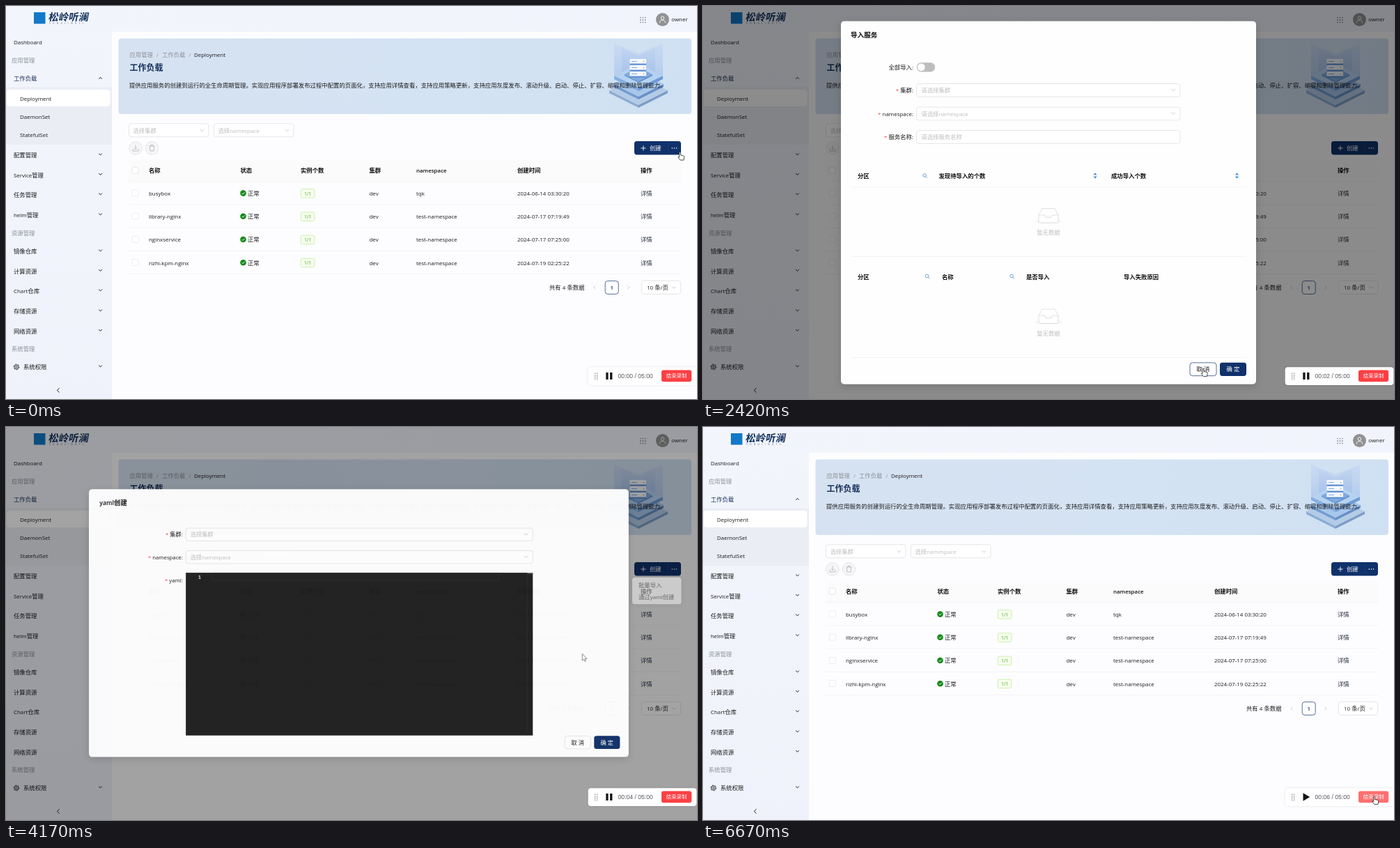
These frames come from a looping animation (992x564 px, 6.76 s). An HTML page:

```html
<!DOCTYPE html>
<html lang="zh-CN">
<head>
<meta charset="utf-8">
<title>工作负载</title>
<style>
html, body { margin: 0; width: 100%; height: 100%; overflow: hidden; background: #fdfdff; }
svg { display: block; width: 100vw; height: 100vh; }
text { font-family: "Open Sans", "Noto Sans CJK SC", "Noto Sans CJK", sans-serif; white-space: pre; }
.clock { font-family: "Liberation Sans", Arial, sans-serif; }
.mono { font-family: "Noto Sans Mono", "DejaVu Sans Mono", monospace; }
.card { filter: drop-shadow(0 3px 6px rgba(0, 0, 0, .14)); }
.soft { filter: drop-shadow(0 2px 4px rgba(0, 0, 0, .14)); }
.faint { filter: drop-shadow(0 0 1.5px rgba(0, 0, 0, .12)); }
</style>
</head>
<body>
<svg id="stage" viewBox="0 0 992 564" preserveAspectRatio="none"></svg>
<script>
const NAVY = '#10316a', INK = '#1c1c1e', GREY = '#8d9199', PALE = '#bfbfc2', EDGE = '#dcdce0', RULE = '#f0f0f1';

// ---- drawing helpers ----
// Latin runs are set a little smaller than the Chinese ones
function text(x, y, s, o = {}) {
  const { size = 8.4, fill = INK, w = 400, anchor = 'start', more = '' } = o;
  const runs = s.match(/[\x00-\x7f]+|[^\x00-\x7f]+/g).map(r =>
    `<tspan font-size="${r.charCodeAt(0) < 128 ? size * .945 : size}">${r}</tspan>`).join('');
  return `<text x="${x}" y="${y + size * .36}" fill="${fill}" font-weight="${w}" text-anchor="${anchor}" ${more}>${runs}</text>`;
}
const rect = (x, y, x2, y2, fill, more = '') =>
  `<rect x="${x}" y="${y}" width="${x2 - x}" height="${y2 - y}" fill="${fill}" ${more}/>`;
const box = (x, y, x2, y2, stroke = EDGE, fill = '#fff', r = 3.6) =>
  rect(x, y, x2, y2, fill, `rx="${r}" stroke="${stroke}" stroke-width=".7"`);
const path = (d, stroke, w = .8, fill = 'none', more = '') =>
  `<path d="${d}" stroke="${stroke}" stroke-width="${w}" fill="${fill}" ${more}/>`;
const line = (x, x2, y, c = RULE) => path(`M${x} ${y}H${x2}`, c, .7);
const dot = (x, y, r, fill, more = '') => `<circle cx="${x}" cy="${y}" r="${r}" fill="${fill}" ${more}/>`;
const poly = (pts, fill) => `<polygon points="${pts}" fill="${fill}"/>`;
const chevron = (x, y, c = '#b9b9bd', h = 2.6, w = .8) =>
  path(`M${x - Math.abs(h)} ${y - h / 2}l${Math.abs(h)} ${h}l${Math.abs(h)} ${-h}`, c, w);
const angle = (x, y, d, c, w = .8) => path(`M${x + d / 2} ${y - Math.abs(d)}l${-d} ${Math.abs(d)}l${d} ${Math.abs(d)}`, c, w);
const group = (id, s) => `<g id="${id}">${s}</g>`;
const bold = { w: 600, fill: '#111' };

// ---- page ----
function sidebar() {
  const items = [[214, '配置管理'], [242.5, 'Service管理'], [271, '任务管理'], [300, 'helm管理'], [352, '镜像仓库'],
    [380.5, '计算资源'], [409, 'Chart仓库'], [438, '存储资源'], [466.5, '网络资源'], [518, '系统权限']];
  let s = rect(0, 0, 992, 564, 'url(#head)') + rect(0, 37, 152, 564, 'url(#side)') +
    rect(152, 37, 992, 564, '#fdfdff') + rect(0, 116.5, 152, 199, '#eaedf4') +
    rect(1, 120, 149.5, 144, '#fff', 'rx="4"');
  s += text(11, 52, 'Dashboard') + text(11, 103.5, '工作负载', { fill: '#1b3158' }) + chevron(135.5, 103.5, INK, -2.3, 1);
  [[77.5, '应用管理'], [326, '资源管理'], [492, '系统管理']].forEach(([y, n]) => s += text(8, y, n, { fill: GREY }));
  [[132.5, 'Deployment'], [159, 'DaemonSet'], [185, 'StatefulSet']].forEach(([y, n]) => s += text(20, y, n));
  items.forEach(([y, n]) => s += text(y === 518 ? 25 : 11, y, n) + chevron(135.5, y - 1.2, INK, 2.3, 1));
  s += dot(15, 518, 3.2, 'none', `stroke="${INK}" stroke-width=".9"`) + dot(15, 518, 1.3, 'none', `stroke="${INK}" stroke-width=".7"`) +
    dot(15, 518, 4, 'none', `stroke="${INK}" stroke-width=".8" stroke-dasharray="1.5 2.69"`);
  return s + angle(75, 551.5, 3.2, INK, 1);
}

function header() {
  let s = rect(40, 9, 56.5, 25.5, '#1378c8') +
    text(0, 0, '松岭听澜', { size: 14.4, w: 900, fill: '#17345f', more: 'transform="translate(61.5 16.3) skewX(-10)"' }) +
    text(62, 24.3, 'SONGLINGTL', { size: 3.4, fill: '#4a6288', more: 'letter-spacing="3.3"' });
  for (let i = 0; i < 9; i++) s += dot(911 + i % 3 * 3.4, 16.6 + Math.floor(i / 3) * 3.4, .9, '#8b8f98');
  s += dot(942.5, 19.5, 9.5, '#929294') + dot(942.5, 17.2, 2.2, 'none', 'stroke="#fff" stroke-width=".9"') +
    path('M938.3 24.4a4.2 4 0 0 1 8.4 0', '#fff', .9);
  return s + text(955.3, 19, 'owner');
}

function banner() {
  let s = rect(161.5, 46.5, 984, 155, 'url(#ban)', 'rx="4"');
  s += poly('873,54 908,68 943,54 943,100 908,118 873,100', 'url(#beam)') + poly('884,60 908,72 932,60 932,98 908,108 884,98', 'url(#beam)');
  const tile = (y, w, h, d, top, left, right) =>
    poly(`${908 - w},${y} 908,${y + h} 908,${y + h + d} ${908 - w},${y + d}`, left) +
    poly(`${908 + w},${y} 908,${y + h} 908,${y + h + d} ${908 + w},${y + d}`, right) +
    poly(`${908 - w},${y} 908,${y - h} ${908 + w},${y} 908,${y + h}`, top);
  s += tile(121, 42, 21, 4, '#b4cbe6', '#8cacd2', '#7c9cc6') + tile(112, 36, 18, 4, '#a7c6ea', '#719cd2', '#6590c6') +
    tile(100, 35, 17, 5, '#b6d2f1', '#84afe2', '#6f9bd5') + tile(98, 20, 10, 2, '#7fabe0', '#6796d4', '#5c8ac9');
  for (let y = 76; y < 96; y += 9)
    s += rect(895.5, y, 919, y + 7.6, '#f3f8ff', 'rx="1"') + rect(895.5, y + 6.6, 919, y + 8.6, '#5d8dd0') +
      rect(898, y + 3, 906, y + 4, '#86abdf') + dot(915.5, y + 3.5, .9, '#d9b46a');
  s += text(177.5, 69.5, '应用管理', { fill: GREY }) + text(216, 69.5, '/', { fill: GREY }) +
    text(224, 69.5, '工作负载', { fill: GREY }) + text(262.5, 69.5, '/', { fill: GREY }) + text(270, 69.5, 'Deployment');
  s += text(177.5, 88.5, '工作负载', { size: 12, w: 700, fill: '#17305c' });
  return s + text(177, 113.7, '提供应用服务的创建到运行的全生命周期管理。实现应用程序部署发布过程中配置的页面化，支持应用详情查看，支持应用策略更新，支持应用灰度发布、滚动升级、启动、停止、扩容、缩容和删除管理能力。');
}

function list() {
  let s = '';
  [[176.5, '选择集群'], [298.5, '选择namespace']].forEach(([x, n]) =>
    s += box(x, 168.8, x + 114.5, 187.8) + text(x + 6, 178.8, n, { fill: PALE }) + chevron(x + 105, 178.6));
  [186, 209.5].forEach(x => s += dot(x, 204, 9.2, '#f6f6f8', `stroke="${EDGE}" stroke-width=".7"`));
  s += path('M186 199.5v6M184 203.6l2 2l2 -2M182 205v3h8v-3', '#aeb0b5') +
    path('M205.6 201h7.8M206.6 201v7h5.8v-7M208 201v-1.5h3v1.5', '#aeb0b5');
  s += rect(902, 194, 969, 213.4, NAVY, 'rx="3.6"') + path('M911.5 204h7M915 200.5v7', '#fff', .9) +
    text(924, 204, '创建', { fill: '#fff' }) + path('M950.5 194v19.4', '#1d437f', .6);
  for (let i = 0; i < 3; i++) s += dot(956.3 + i * 3.1, 204, .8, '#fff');

  const cols = [205, 336.5, 423, 521.5, 589, 734, 911];
  s += rect(176, 220, 969, 252, '#fbfbfc', 'rx="4"') + box(181.2, 231.3, 190.2, 240.3, EDGE, '#fff', 2);
  ['名称', '状态', '实例个数', '集群', 'namespace', '创建时间', '操作'].forEach((n, i) => s += text(cols[i], 236.3, n, bold));
  s += line(176, 969, 252);
  const rows = [['busybox', 'tqk', '2024-06-14 03:30:20'], ['library-nginx', 'test-namespace', '2024-07-17 07:19:49'],
    ['nginxservice', 'test-namespace', '2024-07-17 07:25:00'], ['rizhi-kpm-nginx', 'test-namespace', '2024-07-19 02:25:22']];
  rows.forEach(([name, space, date], i) => {
    const y = 269 + i * 33.2;
    s += box(181.2, y - 5, 190.2, y + 4, '#e4e4e7', '#fff', 2) + text(205, y, name) +
      dot(340.5, y - .4, 4.3, '#128a17') + path(`M338.6 ${y - .4}l1.4 1.5l2.5 -2.8`, '#fff', .9) + text(347, y, '正常') +
      box(423.3, y - 6.3, 443, y + 6.2, '#b7eb8f', '#f6ffed', 2.2) + text(433.2, y, '1/1', { size: 7.4, fill: '#4ca32a', anchor: 'middle' }) +
      text(521.5, y, 'dev') + text(589, y, space) + text(734, y, date) + text(911, y, '详情', { fill: '#2a3040' }) +
      line(176, 969, y + 16);
  });
  return s + text(780, 404, '共有 4 条数据') + angle(845, 404, 2.4, PALE) + box(860.2, 394.6, 879.2, 413.4, NAVY) +
    text(869.7, 404, '1', { w: 600, fill: NAVY, anchor: 'middle' }) + angle(893.7, 404, -2.4, PALE) +
    box(912.3, 394.3, 968.7, 413.4) + text(920, 404, '10 条/页') + chevron(959, 404);
}

// ---- dialogs ----
const label = (x, y, s, must = true) =>
  text(x, y, (must ? '* ' : '') + s + ':', { anchor: 'end' }).replace('>* ', '><tspan fill="#ff4d4f">* </tspan>');

function field(x, x2, y, name, hint, arrow) {
  return label(x - 4.5, y, name) + box(x, y - 9.4, x2, y + 9.4) + text(x + 6.8, y, hint, { fill: PALE }) +
    (arrow ? chevron(x2 - 9.8, y - .4) : '');
}
function buttons(x, y, id) {
  return `<rect id="${id}" x="${x}" y="${y - 9.4}" width="38" height="18.8" rx="3.6" fill="#fff" stroke="${EDGE}" stroke-width=".7"/>` +
    text(x + 19, y, '取 消', { anchor: 'middle' }) + rect(x + 43, y - 9.6, x + 81, y + 9.6, NAVY, 'rx="3.6"') +
    text(x + 62, y, '确 定', { anchor: 'middle', fill: '#fff' });
}
const lens = (x, y) => dot(x - .5, y - .5, 2.3, 'none', 'stroke="#4a90d2" stroke-width=".8"') + path(`M${x + 1.2} ${y + 1.2}l2 2`, '#4a90d2', .9);
const sorter = (x, y) => poly(`${x - 2.6},${y - 1} ${x},${y - 4.2} ${x + 2.6},${y - 1}`, '#4a90d2') +
  poly(`${x - 2.6},${y + 1} ${x},${y + 4.2} ${x + 2.6},${y + 1}`, '#4a90d2');
const empty = y => `<ellipse cx="496" cy="${y + 9}" rx="19" ry="3.6" fill="#f5f5f5"/>` +
  path(`M482 ${y}l5 -9.5h18l5 9.5v10q0 1 -1 1h-26q-1 0 -1 -1z`, '#d9d9d9', .8, '#fff') +
  path(`M482 ${y}h8.5q.5 3.4 2.6 3.4h5.8q2.1 0 2.6 -3.4h8.5`, '#d9d9d9', .8, '#fafafa') +
  text(496, y + 25, '暂无数据', { fill: PALE, anchor: 'middle' });

function importDialog() {
  const heads = (y, list) => list.map(([x, n]) => text(x, y, n, bold)).join('');
  return rect(198, 21.7, 794, 542.7, '#fefeff', 'rx="4.8" class="card"') + text(212, 41.2, '导入服务', { size: 9.6, ...bold }) +
    label(302, 88, '全部导入', false) + rect(306.7, 81.2, 333.2, 94.4, '#bdbdbd', 'rx="6.6"') + dot(313.3, 87.8, 5.4, '#fff') +
    field(306.5, 685, 121, '集群', '请选择集群', true) + field(306.5, 685, 154.5, 'namespace', '请选择namespace', true) +
    field(306.5, 685, 188, '服务名称', '请选择服务名称') +
    heads(244, [[222, '分区'], [338.5, '发现待导入的个数'], [586, '成功导入个数']]) +
    lens(318.5, 243.5) + sorter(563, 243.5) + sorter(766.5, 243.5) + line(212, 780, 260) + empty(300) + line(212, 780, 359.5) +
    heads(388.5, [[222, '分区'], [343, '名称'], [464, '是否导入'], [604, '导入失败原因']]) +
    lens(322, 388) + lens(443.5, 388) + empty(444.5) + line(212, 780, 504.5) + buttons(699, 521.3, 'no1');
}
function yamlDialog() {
  return rect(99.2, 85.4, 892.8, 479, '#fefeff', 'rx="4.8" class="card"') + text(114.8, 105, 'yaml创建', { size: 9.6, ...bold }) +
    field(241.7, 751.9, 152, '集群', '选择集群', true) + field(241.7, 751.9, 185.2, 'namespace', '选择namespace', true) +
    label(237.2, 219, 'yaml') + rect(241.7, 208.2, 751.9, 447.4, '#1f1f1f') +
    rect(280.6, 208.9, 702, 219.5, 'none', 'stroke="#2d2d2d" stroke-width=".8"') +
    path('M743.6 208.2v239.2', '#343434', .6) + rect(743.8, 208.2, 751.9, 209.4, '#8a8a8a') +
    text(262, 214.3, '1', { size: 8, w: 600, fill: '#d6d6d6', anchor: 'middle', more: 'class="mono"' }) + buttons(799, 457.6, 'no2');
}

function recorder() {
  let s = rect(835.7, 518.3, 991.4, 544, '#fff', 'rx="4" class="faint"');
  for (let i = 0; i < 8; i++) s += dot(845.7 + i % 2 * 3, 527.2 + (i >> 1) * 2.7, .75, '#777');
  s += group('pause', rect(861.3, 526, 864.6, 536, '#161616') + rect(867.1, 526, 870.4, 536, '#161616')) +
    group('play', poly('861.5,525.2 871.2,531 861.5,536.8', '#161616'));
  s += `<text id="clock" class="clock" x="878.6" y="534.2" font-size="8.6" fill="#55585e"></text>`;
  return s + `<rect id="stop" x="941" y="522.4" width="43.2" height="16.8" rx="3"/>` +
    text(962.6, 530.8, '结束录制', { size: 7.4, fill: '#fff', anchor: 'middle' });
}

const stage = document.getElementById('stage');
const grad = (id, dir, stops) => `<linearGradient id="${id}" x1="0" y1="0" ${dir}>` +
  stops.map(([o, c, a = 1]) => `<stop offset="${o}" stop-color="${c}" stop-opacity="${a}"/>`).join('') + '</linearGradient>';
stage.innerHTML = '<defs>' + grad('head', 'x2="1" y2="0"', [[0, '#f2f5fc'], [1, '#f1f4fc']]) +
  grad('side', 'x2="0" y2="1"', [[0, '#f2f5fc'], [1, '#eff2fa']]) +
  grad('ban', 'x2="1" y2="0"', [[0, '#d6e2f1'], [.6, '#d4e3f3'], [1, '#cfe0f2']]) +
  grad('beam', 'x2="0" y2="1"', [[0, '#b9cdf0', .35], [1, '#8fb3e6', .6]]) + '</defs>' +
  sidebar() + header() + banner() + list() +
  '<rect id="mask" width="992" height="564"/>' +
  group('dlg1', importDialog()) + group('dlg2', yamlDialog()) +
  group('menu', rect(899, 216, 969.5, 259, '#fff', 'rx="4" class="soft"') + text(908, 228.5, '批量导入') + text(908, 247.5, '通过yaml创建')) +
  recorder() +
  group('arrow', path('M0 0v9.6l2.2 -2l1.5 3.3l1.5 -.7l-1.5 -3.2h3z', '#444', .6, '#fff')) +
  group('hand', path('M-.9 .5q.9 -1 1.8 0v4l4.2 .9q1.2 .3 1.1 1.6l-.7 4.6h-5l-3.2 -4q-.2 -1.2 1.8 -.2z', '#222', .8, '#fff', 'stroke-linejoin="round"'));

// ---- motion ----
const LOOP = 6760, $ = id => document.getElementById(id);
const clamp = v => Math.max(0, Math.min(1, v));
const ramp = (t, start, len) => clamp((t - start) / len);

function bezier(a, b, c, d) {
  const at = (p, q, u) => 3 * (1 - u) ** 2 * u * p + 3 * (1 - u) * u * u * q + u ** 3;
  return x => {
    let lo = 0, hi = 1;
    for (let i = 0; i < 24; i++) { const m = (lo + hi) / 2; at(a, c, m) < x ? lo = m : hi = m; }
    return at(b, d, lo);
  };
}
const easeIn = bezier(.08, .82, .17, 1), easeOut = bezier(.78, .14, .15, .86);

const dialogs = [
  { id: 'dlg1', x: 940, y: 227, open: 960, shut: 2424 },
  { id: 'dlg2', x: 938, y: 248, open: 4030, shut: 5701 }
];
const menus = [[90, 860], [2990, 4060]];
const hands = [[0, 1060], [1750, 2430], [2900, 4040], [4920, 5690], [6250, LOOP]];
const track = [[0, 967.5, 209.5], [330, 960, 203], [500, 960, 203], [750, 940, 226], [1040, 940, 226], [1330, 868, 295],
  [1830, 718, 520], [2420, 718, 520], [2500, 806, 458], [2580, 916, 378], [2750, 948, 275], [2920, 960.5, 201.5],
  [3500, 960.5, 201.5], [3750, 938, 248], [4020, 938, 248], [4170, 827.3, 325.5], [4420, 806, 405], [5080, 820, 456],
  [5750, 820, 456], [6330, 963.5, 530], [LOOP, 963.5, 530]];

const within = (t, spans) => spans.some(([a, b]) => t >= a && t < b);
const show = (id, on) => $(id).style.display = on ? '' : 'none';

function cursorAt(t) {
  const i = track.findIndex(k => k[0] > t), [t0, x0, y0] = track[i - 1], [t1, x1, y1] = track[i];
  const p = (t - t0) / (t1 - t0);
  return [x0 + (x1 - x0) * p, y0 + (y1 - y0) * p];
}

function draw(ms) {
  const step = Math.min(80, Math.floor((Math.floor(ms / 10) + .5) / (25 / 3)));
  const t = Math.round(step * 25 / 3) * 10;

  let shade = 0;
  dialogs.forEach(d => {
    const p = t < d.shut ? easeIn(ramp(t, d.open, 250)) : 1 - easeOut(ramp(t, d.shut, 200));
    const k = .2 + .8 * p;
    shade = Math.max(shade, t < d.shut ? ramp(t, d.open, 175) : 1 - ramp(t, d.shut, 200));
    show(d.id, p > .004);
    $(d.id).setAttribute('opacity', p);
    $(d.id).setAttribute('transform', `translate(${d.x * (1 - k)} ${d.y * (1 - k)}) scale(${k})`);
  });
  $('mask').setAttribute('fill-opacity', .45 * shade);

  const m = Math.max(...menus.map(([a, b]) => easeIn(ramp(t, a, 220)) * (1 - ramp(t, b, 200))));
  const sy = .8 + .2 * m;
  show('menu', m > .004);
  $('menu').setAttribute('opacity', m);
  $('menu').setAttribute('transform', `translate(0 ${216 * (1 - sy)}) scale(1 ${sy})`);

  $('no1').setAttribute('stroke', t >= 1750 ? NAVY : EDGE);
  $('no2').setAttribute('stroke', t >= 4920 ? NAVY : EDGE);
  $('clock').textContent = `00:0${Math.floor(t / 1000)} / 05:00`;
  $('stop').setAttribute('fill', t >= 6330 ? '#ff6f70' : '#fb4044');
  show('play', t >= 6500);
  show('pause', t < 6500);

  const [x, y] = cursorAt(t), hand = within(t, hands);
  show('hand', hand);
  show('arrow', !hand);
  $(hand ? 'hand' : 'arrow').setAttribute('transform', `translate(${x} ${y})`);
}

const born = performance.now();
(function tick() {
  draw((performance.now() - born) % LOOP);
  requestAnimationFrame(tick);
})();
</script>
</body>
</html>
```
